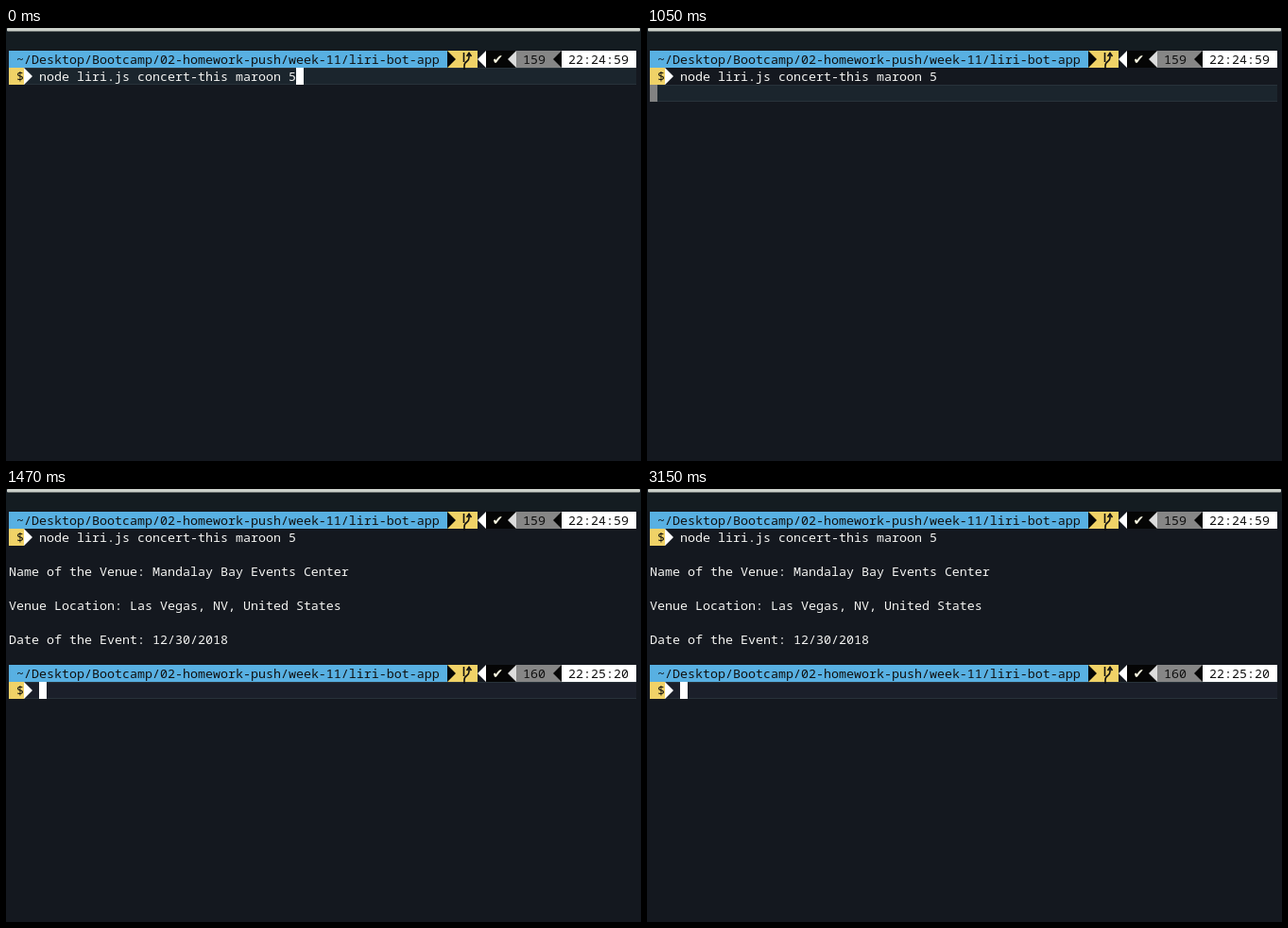
Animation of 672x458 px, one loop 3220 ms. Source, as an HTML page:

```html
<!DOCTYPE html>
<html lang="en">
<head>
<meta charset="utf-8">
<title>Terminal</title>
<style>
  html, body { margin: 0; width: 100%; height: 100%; overflow: hidden; background: #14181f; }
  svg { display: block; width: 672px; height: 458px; }
  text { font: 13.333px "Noto Sans Mono", "Liberation Mono", monospace; fill: #f4f4f2; }
  .ink text, text.ink { fill: #101010; }
  text.check { font: 14px "DejaVu Sans", sans-serif; fill: #fffde4; }

  .guide, .caret, .shade, .output, .next { animation: 3220ms step-end infinite; }
  .guide { animation-name: guide; }
  .caret { animation-name: caret; }
  .shade { animation-name: shade; }
  .output { animation-name: output; }
  .next { animation-name: next; }

  @keyframes guide {
    0% { transform: translateY(42px); fill: #1b252d; }
    17.39% { transform: translateY(60px); fill: #1b1f2a; }
    32.6% { transform: translateY(60px); fill: #1b252d; }
    43.47% { transform: translateY(168px); fill: #1b252d; }
    45.65%, 100% { transform: translateY(204px); fill: #1b1f2a; }
  }
  @keyframes caret {
    0% { transform: translate(307px, 42px); }
    17.39% { transform: translate(3px, 60px); }
    43.47% { transform: translate(3px, 168px); }
    45.65%, 100% { transform: translate(35px, 204px); }
  }
  /* the caret blinks softly between white and grey */
  @keyframes shade {
    0% { fill: #fff; animation-timing-function: steps(8, end); }
    17.39% { fill: #828282; }
    32.6% { fill: #828282; animation-timing-function: steps(5, end); }
    43.47% { fill: #ece6da; }
    45.65% { fill: #fff; }
    65.21% { fill: #fff; animation-timing-function: steps(4, end); }
    71.73% { fill: #828282; }
    82.6% { fill: #828282; animation-timing-function: steps(7, end); }
    97.82%, 100% { fill: #fff; }
  }
  @keyframes output {
    0% { visibility: hidden; }
    43.47%, 100% { visibility: visible; }
  }
  @keyframes next {
    0% { visibility: hidden; }
    45.65%, 100% { visibility: visible; }
  }
</style>
</head>
<body>
<svg viewBox="0 0 672 458">
  <defs>
    <g id="prompt">
      <path fill="#58b0e2" d="M3 0h464v18H3z"/>
      <path fill="#f0d267" d="M467 0h32v18h-32zM3 18h16v18H3z"/>
      <path fill="#050505" d="M467 0l9 9-9 9zM508 0h32v18h-32z"/>
      <path fill="#fff" d="M508 0l-9 9 9 9zM588 0h79v18h-79zM19 18l9 9-9 9z"/>
      <path fill="#dcdcdc" d="M540 0l-9 9 9 9z"/>
      <path fill="#868686" d="M540 0h48v18h-48z"/>
      <path fill="#050505" d="M588 0l-9 9 9 9z"/>
      <g fill="none" stroke="#101010" stroke-width="1.6">
        <path d="M484.5 2v10M485 20v-4q0-3 2.500-4.500T490 7V3"/>
        <path d="M487.500 6l2.500-3.500 2.500 3.500"/>
      </g>
      <text class="check" x="514.5" y="14">✔</text>
      <g class="ink">
        <text x="11" y="14">~/Desktop/Bootcamp/02-homework-push/week-11/liri-bot-app</text>
        <text x="11" y="32">$</text>
      </g>
    </g>
  </defs>

  <rect width="672" height="458" fill="#14181f"/>
  <rect y="3" width="672" height="20" fill="#141c21"/>
  <rect x="1" width="670" height="3.500" rx="1" fill="#cbd0ca"/>

  <g class="guide">
    <rect x="3" width="664" height="18"/>
    <path d="M3 .5h664M3 17.500h664" stroke="#28323a"/>
  </g>

  <use href="#prompt" y="24"/>
  <g class="ink">
    <text x="547" y="38">159</text>
    <text x="595" y="38">22:24:59</text>
  </g>
  <text x="35" y="56">node liri.js concert-this maroon 5</text>

  <g class="output">
    <text x="3" y="92">Name of the Venue: Mandalay Bay Events Center</text>
    <text x="3" y="128">Venue Location: Las Vegas, NV, United States</text>
    <text x="3" y="164">Date of the Event: 12/30/2018</text>
  </g>

  <g class="next">
    <use href="#prompt" y="186"/>
    <g class="ink">
      <text x="547" y="200">160</text>
      <text x="595" y="200">22:25:20</text>
    </g>
  </g>

  <g class="caret"><rect class="shade" width="8" height="18"/></g>
</svg>
</body>
</html>
```
